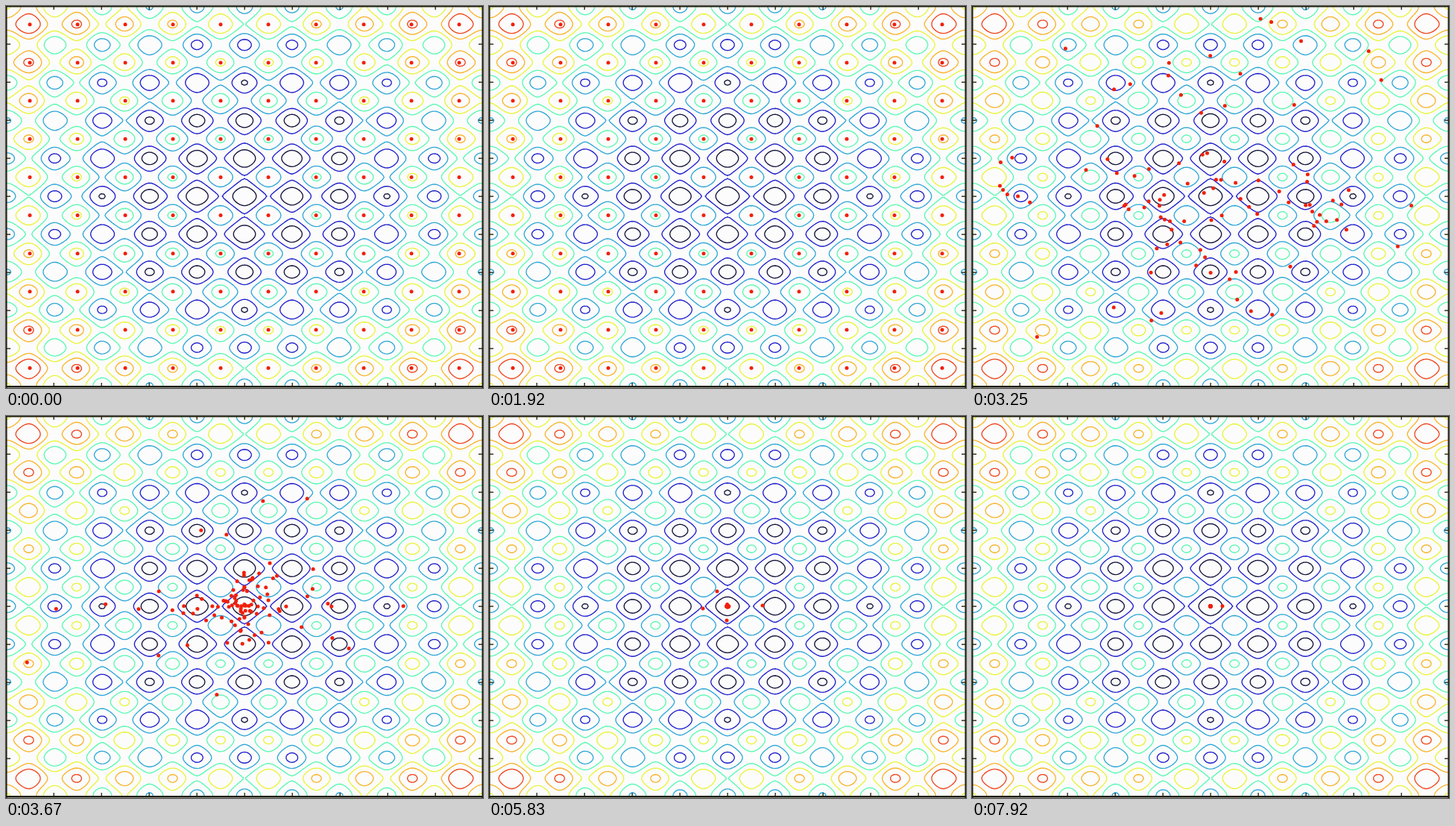
Animation of 640 by 512 pixels, one loop 8 s. Source, as an HTML page with a canvas:

```html
<!DOCTYPE html>
<html lang="en">
<head>
<meta charset="utf-8">
<title>Particle swarm on the Rastrigin function</title>
<style>
  html, body { margin: 0; width: 100%; height: 100%; overflow: hidden; background: #fcfcfc; }
  canvas { position: absolute; left: 0; top: 0; }
</style>
</head>
<body>
<canvas id="field" width="640" height="512"></canvas>
<canvas id="swarm" width="640" height="512"></canvas>
<script>
const W = 640, H = 512, CX = 320, CY = 255, SX = 64, SY = 51;
const LOOP = 8000, FRAME = 1000 / 12, COUNT = 100;

// ---------- contour field ----------
const field = document.getElementById('field').getContext('2d');
const MESH = 200;
const coord = i => -5 + 10 * i / MESH;
const bump = Array.from({ length: MESH + 1 }, (_, i) => {
  const v = coord(i);
  return 10 + v * v - 10 * Math.cos(2 * Math.PI * v);
});

const contours = [
  [9.9, '#14143c'], [19.9, '#2020cc'], [30, '#30a8d8'], [40.51, '#5cf8b4'],
  [50.51, '#e8f43c'], [60.51, '#fab42c'], [70.51, '#f0461e'], [80.51, '#640a00']
];

// Marching squares: join the edge crossings of one cell.
function traceCell(i, j, level) {
  const corners = [[i, j], [i + 1, j], [i + 1, j + 1], [i, j + 1]];
  const z = corners.map(([a, b]) => bump[a] + bump[b] - level);
  const hits = [];
  for (let e = 0; e < 4; e++) {
    const f = (e + 1) % 4;
    if ((z[e] > 0) === (z[f] > 0)) continue;
    const u = z[e] / (z[e] - z[f]), [a, b] = corners[e], [c, d] = corners[f];
    hits.push([CX + SX * coord(a + u * (c - a)), CY - SY * coord(b + u * (d - b))]);
  }
  if (hits.length === 4) {
    const mid = z[0] + z[1] + z[2] + z[3] > 0;
    if (mid !== (z[0] > 0)) hits.unshift(hits.pop());
  }
  for (let k = 0; k < hits.length; k += 2) {
    field.moveTo(...hits[k]);
    field.lineTo(...hits[k + 1]);
  }
}

function drawField() {
  field.fillStyle = '#fcfcfc';
  field.fillRect(0, 0, W, H);
  field.lineWidth = 1.35;
  field.lineCap = 'round';
  for (const [level, color] of contours) {
    field.strokeStyle = color;
    field.beginPath();
    for (let i = 0; i < MESH; i++)
      for (let j = 0; j < MESH; j++) traceCell(i, j, level);
    field.stroke();
  }
  field.fillStyle = '#1c1c06';
  field.fillRect(0, 0, W, 1.5);
  field.fillRect(0, 509, W, 2.5);
  field.fillRect(0, 0, 1.5, H);
  field.fillRect(638.5, 0, 1.5, H);
  for (let k = 1; k < 10; k++) {
    for (const y of [0, 505]) field.fillRect(k * SX - 0.5, y, 1.3, 5);
    for (const x of [0, 634]) field.fillRect(x, k * SY - 0.5, 6, 1.3);
  }
}

// ---------- swarm ----------
const rand = (a, b, c) => {
  const s = Math.sin(a * 12.9898 + b * 78.233 + c * 37.719) * 43758.5453;
  return s - Math.floor(s);
};
const gauss = (i, step, axis) =>
  Math.sqrt(-2 * Math.log(1 - rand(i, step, axis))) * Math.cos(2 * Math.PI * rand(i, step, axis + 2));

// The last particles to settle: offset from the centre and fade per step.
const LATE = 33;
const strays = [[47, -1, 0.95], [-14, -20, 0.7], [-33, 3, 0.7], [-1, 19, 0.7]];

function strayAt([dx, dy, fade], n) {
  const f = fade ** n;
  return [CX + dx * f, CY + (dy + 0.6 * dx * Math.sin(n * Math.PI / 3)) * f];
}

// A lattice at first, then a random cloud that shrinks and grows a longer tail.
function place(i, step) {
  if (step === 0) return [32 + 64 * (i % 10), 24.8 + 51.15 * Math.floor(i / 10)];
  if (step >= LATE && i < strays.length) return strayAt(strays[i], step - LATE);
  const age = Math.max(0, step - 3);
  const spread = 230 * Math.exp(-0.1 * age ** 1.27), tail = 1 + 0.085 * age;
  const offset = axis => {
    const g = gauss(i, step, axis);
    return spread * Math.sign(g) * Math.abs(g) ** tail;
  };
  return [CX + offset(1), CY + 0.65 * offset(2)];
}

const swarm = document.getElementById('swarm').getContext('2d');
let shown = -1;

function drawSwarm(step) {
  swarm.clearRect(0, 0, W, H);
  swarm.fillStyle = '#f0200c';
  for (let i = 0; i < COUNT; i++) {
    const [x, y] = place(i, step);
    swarm.beginPath();
    swarm.arc(x, y, 2.5, 0, 2 * Math.PI);
    swarm.fill();
  }
}

// Ten iterations a second shown at twelve frames a second: every sixth frame repeats.
function tick() {
  const n = Math.min(95, Math.floor((performance.now() % LOOP + 4) / FRAME));
  const step = Math.max(0, n - Math.floor((n + 3) / 6) - 25);
  if (step !== shown) drawSwarm(shown = step);
  requestAnimationFrame(tick);
}

drawField();
tick();
</script>
</body>
</html>
```
